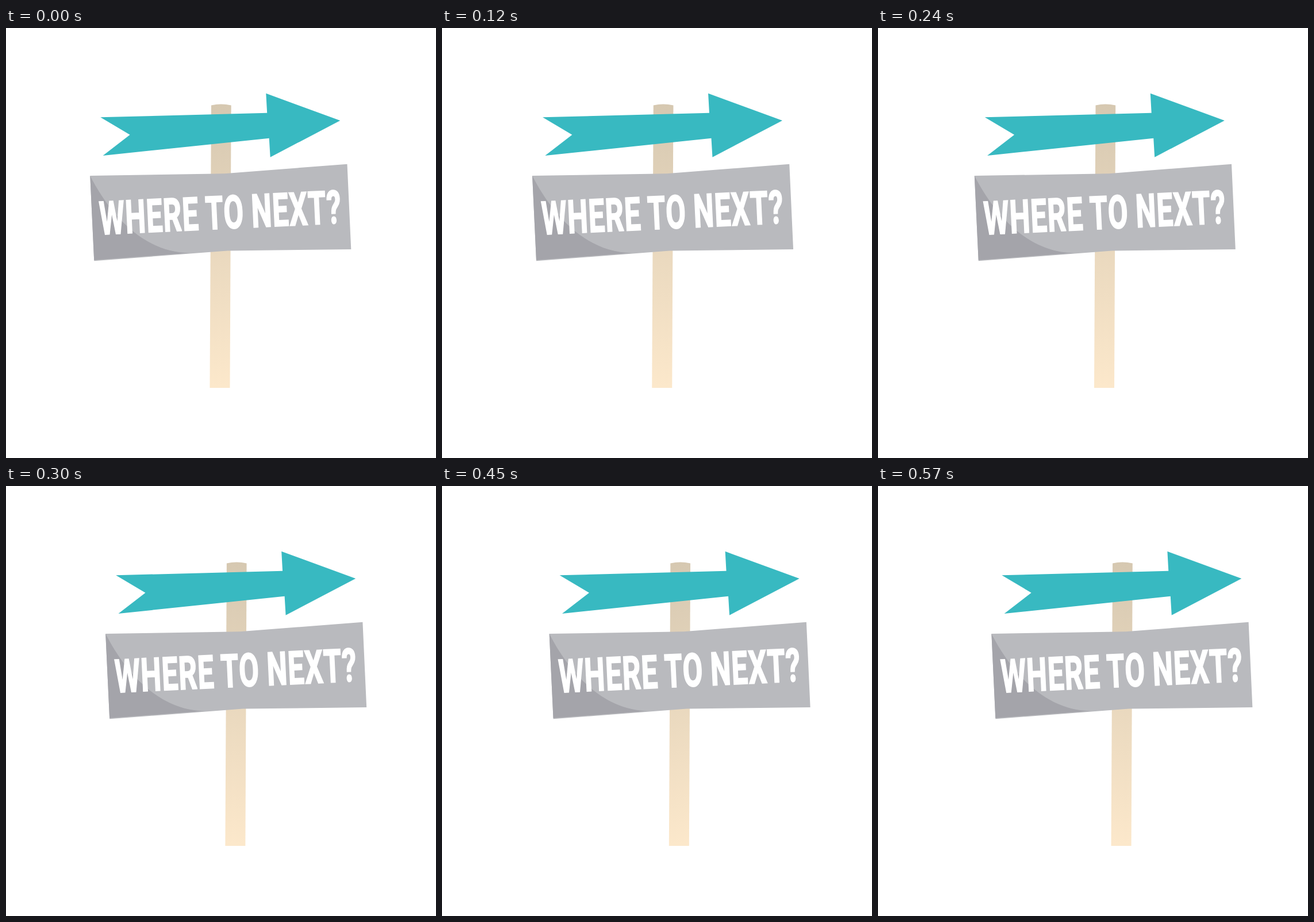
These frames come from a looping animation (748 px wide and 748 px high, 600 ms). An HTML page:

```html
<!DOCTYPE html>
<html lang="en">
<head>
<meta charset="utf-8">
<title>Signpost</title>
<style>
  html, body { margin: 0; width: 100%; height: 100%; overflow: hidden; background: #fff; }
  svg { display: block; width: 100vw; height: 100vh; }
  text {
    font: 700 80px Roboto, "Liberation Sans", sans-serif;
    letter-spacing: 1.8px;
    word-spacing: -1.5px;
    fill: #fff;
    stroke: #fff;
    stroke-width: 1.8px;
    vector-effect: non-scaling-stroke;
  }
</style>
</head>
<body>
<svg viewBox="0 0 748 748">
  <defs>
    <linearGradient id="wood" x1="0" y1="0" x2="0" y2="1">
      <stop offset="0" stop-color="#d6c8b1"/>
      <stop offset="1" stop-color="#fce8cb"/>
    </linearGradient>
  </defs>
  <g id="signpost">
    <path fill="url(#wood)" d="M357 134.500Q374 130.500 391.700 134.500L389.500 626H354.500Z"/>
    <path fill="#38b9c1" d="M164.300 155.300L454.200 147.800L452.300 113.800L581.300 161L459.700 224.700L457.700 191.700L168.600 222L215.600 185.700Z"/>
    <path fill="#b9babe" d="M146.300 257L380 253.300L593.500 236.700L600.300 385L385 387.600L153.300 405.300Z"/>
    <path fill="#a4a4aa" d="M146.300 257C178 319 236 391 320 391.300L153.200 403.700Z"/>
    <text transform="translate(163.800 359.200) rotate(-2.7) scale(.627 1)">WHERE TO NEXT?</text>
  </g>
</svg>
<script>
  const LOOP = 600, STEP = 30, SHIFT = 51.1;
  const signpost = document.getElementById('signpost');
  const lastStep = LOOP / STEP - 1;

  // Slides right in even steps, then jumps back.
  function draw(time) {
    const step = Math.floor((time % LOOP) / STEP);
    signpost.setAttribute('transform', `translate(${SHIFT * step / lastStep} 0)`);
  }

  const start = performance.now();
  function tick() {
    draw(performance.now() - start);
    requestAnimationFrame(tick);
  }
  tick();
</script>
</body>
</html>
```
